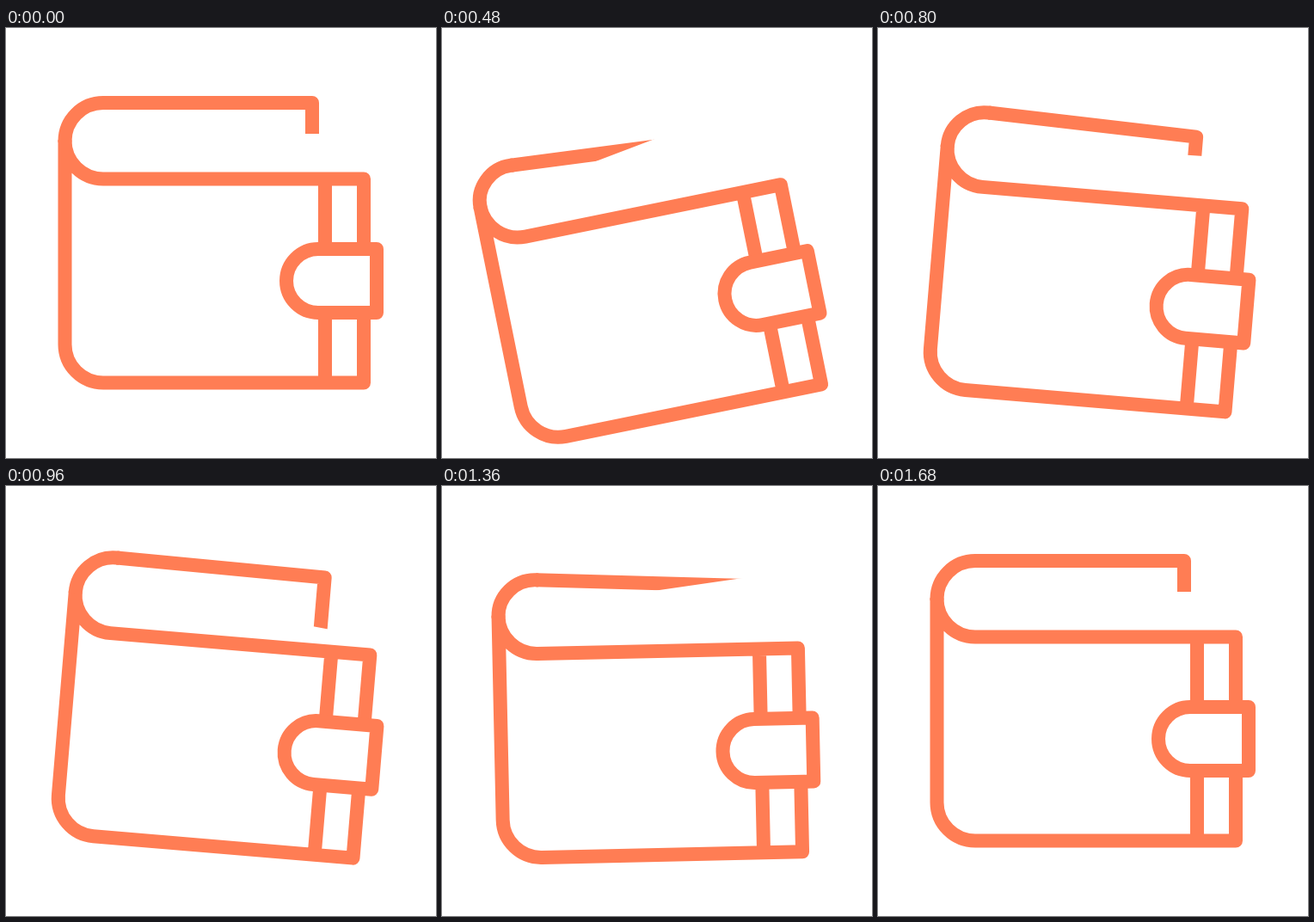
An HTML page for the animation above (2000 ms loop, 500 px wide and 500 px high).

```html
<!DOCTYPE html>
<html lang="en">
<head>
<meta charset="utf-8">
<title>Wallet</title>
<style>
  html, body { margin: 0; width: 100%; height: 100%; overflow: hidden; background: #fff; }
  svg { display: block; width: 100%; height: 100%; }
  path { fill: none; stroke: #ff7d54; stroke-width: 16; stroke-linejoin: round; }
</style>
</head>
<body>
<svg viewBox="0 0 500 500">
  <clipPath id="above"><path id="cut" d="M-400 -400H900V123H-400Z"/></clipPath>
  <g id="wallet">
    <path d="M68.5 130V368A44.5 44.5 0 0 0 113 412.5H416V331M371 412V331M371 257V176M416 257V175.5H113A44.5 44.5 0 0 1 68.5 131"/>
    <path d="M431 257H363a37 37 0 0 0 0 74H431Z"/>
    <path id="curl"/>
    <path id="flap" clip-path="url(#above)"/>
  </g>
</svg>
<script>
const LOOP = 2000, STEP = 40;
const $ = id => document.getElementById(id);
const ease = u => u * u * (3 - 2 * u);

// Eases from rest through [time, value] poses.
const swing = (...poses) => t => {
  let t0 = 0, v0 = 0;
  for (const [t1, v1] of poses) {
    if (t < t1) return v0 + (v1 - v0) * ease((t - t0) / (t1 - t0));
    [t0, v0] = [t1, v1];
  }
  return v0;
};

const tilt = swing([480, -11.5], [720, 4.8], [960, 4.8], [1200, -4.8], [1440, 0]);
const drop = swing([520, 38.5], [1080, 2.5], [1240, 16.5], [1410, 16.5], [1680, 0]);
const droop = swing([300, 4], [540, 4], [980, 0.6], [1200, 3.8], [1680, 0]);
const hinge = swing([480, -9.3], [620, -9.3], [960, 5.9], [1200, -10.8], [1600, 0]);

function draw(t) {
  $('wallet').setAttribute('transform', `translate(0 ${drop(t)}) rotate(${tilt(t)} 250 270)`);

  // The flap sinks as it droops; the cut swings about its hinge.
  const sag = droop(t), k = Math.tan(sag * Math.PI / 180), top = 87 + sag;
  const bend = (131.5 - top) * 0.552, reach = 24.6;
  $('curl').setAttribute('d',
    `M68.5 133V131.5c0 ${-bend} ${44.5 - reach} ${top - reach * k - 131.5} 44.5 ${top - 131.5}l3 ${3 * k}`);
  $('flap').setAttribute('d', `M113 ${top}L356 ${top + 243 * k}V240`);
  $('cut').setAttribute('transform', `rotate(${hinge(t)} 107 123)`);
}

const start = performance.now();
function tick() {
  const t = (performance.now() - start) % LOOP;
  draw(Math.floor(t / STEP) * STEP);
  requestAnimationFrame(tick);
}
tick();
</script>
</body>
</html>
```
